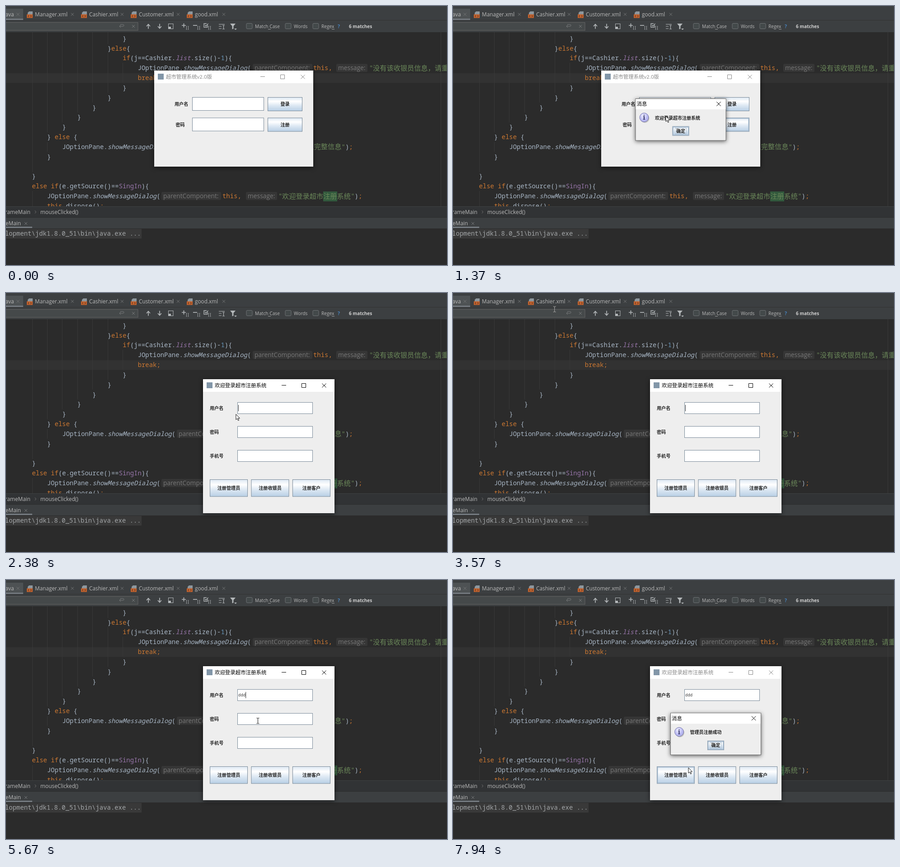
Write an HTML page that moves like this. It is 976 px wide and 574 px high and loops after 8 s.

```html
<!DOCTYPE html>
<html lang="zh-CN">
<head>
<meta charset="utf-8">
<style>
html, body { margin: 0; width: 100%; height: 100%; overflow: hidden; background: #2b2b2b; }
svg { display: block; width: 976px; height: 574px; }
text { white-space: pre; font-family: 'Open Sans', 'Noto Sans CJK SC', 'Noto Sans CJK', sans-serif; }
.code { font: 13.93px 'Noto Sans Mono', monospace; fill: #a9b7c6; }
.zh { font: 300 15.2px 'Noto Sans CJK SC', 'Noto Sans CJK', sans-serif; fill: #6a8759; }
.typed { font: 9px 'Liberation Mono', monospace; fill: #333; }
.kw { fill: #cc7832; }
.field { fill: #9876aa; }
.str { fill: #6a8759; }
.num { fill: #6897bb; }
.call { font-style: italic; }
.shadow { filter: drop-shadow(0 2px 5px #0009); }
</style>
</head>
<body>
<svg viewBox="0 0 976 574">
  <defs>
    <linearGradient id="ocean" x2="0" y2="1">
      <stop stop-color="#dde8f3"/><stop offset=".3" stop-color="#fff"/>
      <stop offset=".6" stop-color="#dde8f3"/><stop offset="1" stop-color="#b8cfe5"/>
    </linearGradient>
    <radialGradient id="info" cx=".4" cy=".3">
      <stop stop-color="#eeeeff"/><stop offset="1" stop-color="#b9b9f2"/>
    </radialGradient>
    <clipPath id="editor"><path d="M0 58H976V444H0Z"/></clipPath>
  </defs>
  <g id="ide"></g>
  <g id="login"></g>
  <g id="register"></g>
  <g id="dialog"></g>
  <g id="cursor"></g>
</svg>
<script>
const $ = id => document.getElementById(id);
const show = (id, on) => $(id).setAttribute('visibility', on ? 'inherit' : 'hidden');

const UI = '#bababa', DIM = '#77797a';
const rect = (x, y, w, h, fill, more = '') =>
  `<rect x="${x}" y="${y}" width="${w}" height="${h}" fill="${fill}" ${more}/>`;
const line = (d, color, width = 1) =>
  `<path d="${d}" fill="none" stroke="${color}" stroke-width="${width}"/>`;
const text = (x, y, size, fill, content, more = '') =>
  `<text x="${x}" y="${y}" font-size="${size}" fill="${fill}" ${more}>${content}</text>`;
const cross = (x, y, r, color) =>
  line(`M${x - r} ${y - r}l${2 * r} ${2 * r}m0 ${-2 * r}l${-2 * r} ${2 * r}`, color);

// ---- editor ----
const baseline = row => 76.7 + 21.83 * row;
const indent = depth => 57.5 + 33.45 * depth;
const span = (name, s) => `<tspan class="${name}">${s}</tspan>`;
const code = (row, x, s) => `<text class="code" x="${x}" y="${baseline(row)}">${s}</text>`;
const zh = (row, x, s) => `<text class="zh" x="${x}" y="${baseline(row) + .6}">${s}</text>`;
const hint = (row, x, w, s) =>
  rect(x, baseline(row) - 14, w, 18, '#363636', 'rx="3"') +
  text(x + 4, baseline(row) - .3, 13.8, '#787878', s);

function messageCall(row, depth, xs, message, closed) {
  const [parent, self, label, quote] = xs;
  const end = quote + 8.2 + message.length * 15.2;
  return code(row, indent(depth), 'JOptionPane.' + span('call', 'showMessageDialog') + '(') +
    hint(row, parent, 132, 'parentComponent:') + code(row, self, span('kw', 'this,')) +
    hint(row, label, 69, 'message:') + code(row, quote, span('str', '"')) +
    zh(row, quote + 8, message) +
    (closed ? code(row, end, span('str', '"') + ')' + span('kw', ';')) : '');
}

function editor() {
  const guides = [[0, 58, 368], [1, 58, 280], [2, 58, 258], [3, 58, 236], [4, 58, 214],
    [5, 58, 84], [5, 104, 192], [6, 126, 170], [1, 302, 323], [0, 410, 444]];
  const braces = [[0, 6], [5, 6], [6, 5], [7, 4], [8, 3], [9, 2], [12, 1], [14, 0]];
  return rect(0, 58, 976, 386, '#2b2b2b') + rect(0, 149, 976, 21.5, '#323232') +
    guides.map(([d, a, b]) => line(`M${Math.round(indent(d)) + .5} ${a}V${b}`, '#383838')).join('') +
    line('M962.5 58V444', '#3a3a3a') + rect(702, 411, 31, 22, '#32593d') +
    braces.map(([row, d]) => code(row, indent(d), '}')).join('') +
    code(1, indent(5), '}' + span('kw', 'else') + '{') +
    code(2, indent(6), span('kw', 'if') + '(j==Cashier.' + span('field call', 'list') +
      '.size()-' + span('num', '1') + '){') +
    messageCall(3, 7, [546, 680, 731, 804], '没有该收银员信息，请重', false) +
    code(4, indent(7), span('kw', 'break;')) +
    code(10, indent(1), '} ' + span('kw', 'else') + ' {') +
    messageCall(11, 2, [378, 512.5, 556, 628], '请输入完整信息', true) +
    code(15, indent(0), span('kw', 'else if') + '(e.getSource()==' + span('field', 'SingIn') + '){') +
    messageCall(16, 1, [344, 479, 531, 603], '欢迎登录超市注册系统', true) +
    code(17, indent(1), span('kw', 'this') + '.dispose()' + span('kw', ';'));
}

function tab(x, name, closeX) {
  return `<path d="M${x + 5} 12h8v8h-11v-5Z" fill="#8d979e"/>` + rect(x, 18.5, 13, 8, '#c4622d') +
    line(`M${x + 5} 20.5l-2.5 2 2.5 2m3-4l2.5 2-2.5 2`, '#3c2a20') +
    text(x + 18, 22.5, 11.8, UI, name) + cross(closeX, 18.5, 3, DIM);
}

function toolbar() {
  const icon = '#b4b8ba';
  const box = (x, label) => rect(x + .5, 38.5, 13, 12, '#43494a', 'stroke="#6f7375" rx="2"') +
    text(x + 19.5, 49.3, 10.2, UI, label);
  const bars = x => line(`M${x} 45v7m4-7v7m-5-7h2m2 0h2m-6 7h2m2 0h2`, '#9a9ea0');
  return rect(-2, 36.5, 294, 17.5, '#45494a', 'stroke="#646464"') +
    line('M253 41h6q2 0 2 2t-2 2h-8m3-3l-3 3 3 3', DIM) + cross(282, 45, 3, DIM) +
    line('M315 50.5V41m-4 4l4-4.5 4 4.5', icon, 1.7) + line('M340 39.5V49m-4-4l4 4.5 4-4.5', icon, 1.7) +
    rect(359.5, 39.5, 10.5, 11, 'none', `stroke="${icon}"`) + rect(360, 46, 5, 4, icon) +
    line('M389 43h9m-4.5-4.5v9', icon, 1.7) + bars(399.5) +
    line('M414 43h9', icon, 1.7) + bars(424.5) +
    line('M446 42v5h-8v-8h6m-4 3l2.5 2.5 5-5.5', icon, 1.3) + bars(448.5) +
    line('M471 40.5h13M471 45h6m-6 5h6m4.5-7v8m-2.5-8h5m-5 8h5', icon, 1.2) +
    `<path d="M496 39h12l-4.5 5.5v6l-3 1v-7Zm9 11h6l-3 3Z" fill="${icon}"/>` +
    box(531.5, 'Match Case') + box(617.5, 'Words') + box(678.5, 'Regex') +
    line('M580 51.5h6M721 51.5h6', UI, .8) +
    text(734, 49.3, 11, '#4a91d8', '?', 'font-weight="600"') +
    text(759, 49.3, 10, '#d0d0d0', '6 matches', 'font-weight="700"');
}

$('ide').innerHTML =
  rect(0, 0, 976, 58, '#3c3f41') + rect(0, 6, 38, 25, '#4e5254') + rect(0, 31, 976, 1, '#323232') +
  rect(0, 28, 38, 3, '#747a80') + text(17.5, 22.5, 11.8, UI, 'ava', 'text-anchor="end"') +
  cross(26.5, 18.5, 3, DIM) +
  tab(46, 'Manager.xml', 147) + tab(166, 'Cashier.xml', 257) +
  tab(276, 'Customer.xml', 381) + tab(400, 'good.xml', 482) + toolbar() +
  `<g clip-path="url(#editor)">${editor()}</g>` +
  rect(0, 444, 976, 25, '#313335') + rect(0, 444, 976, 1, '#3f4244') +
  text(54, 460.5, 11.8, UI, 'rameMain', 'text-anchor="end"') +
  line('M64 453.5l2.5 3-2.5 3', '#777') + text(76, 460.5, 11.9, UI, 'mouseClicked()') +
  rect(0, 468, 976, 25, '#3c3f41') + rect(0, 468, 976, 1, '#2a2a2a') +
  rect(0, 489, 58, 3, '#747a80') + text(33, 486, 11.8, UI, 'eMain', 'text-anchor="end"') +
  cross(44, 482, 3, DIM) + rect(0, 493, 976, 81, '#2b2b2b') + rect(0, 494, 300, 21.5, '#393939') +
  `<text class="code" x="-2" y="509.2" style="fill:#a3a6a8">lopment\\jdk1.8.0_51\\bin\\java.exe ...</text>`;

// ---- dialogs ----
const label = (x, y, s, more = '') => text(x, y + 3.7, 10.1, '#222', s, `font-weight="700" ${more}`);
const input = (x, y, w, h) => rect(x + .5, y + .5, w - 1, h - 1, '#fff', 'stroke="#7a8a99"');
const button = (x, y, w, h, s, id) =>
  rect(x + .5, y + .5, w - 1, h - 1, 'url(#ocean)', 'stroke="#7a8a99"') +
  `<g id="${id}Hot">${rect(x + 1.5, y + 1.5, w - 3, h - 3, 'none', 'stroke="#a3b8cc" stroke-width="2"')}</g>` +
  `<g id="${id}Down">${rect(x + 1, y + 1, w - 2, h - 2, '#b8cfe5')}</g>` +
  label(x + w / 2, y + h / 2, s, 'text-anchor="middle"');

function frame(x, y, w, h, title, id) {
  const right = x + w;
  return rect(x, y, w, h, '#eee', 'class="shadow"') + rect(x, y, w, 28, '#fff') +
    rect(x + 8, y + 7, 13, 13, '#8296a8') +
    `<g id="${id}Title" fill="#000" stroke="#000">` +
    text(x + 26, y + 18.3, 11.45, 'inherit', title, 'stroke="none"') +
    `<path d="M${right - 117} ${y + 13.5}h10m34.5-4h9v9h-9zm45 0l9 9m0-9l-9 9" fill="none"/></g>`;
}

function setActive(id, on) {
  for (const name of ['fill', 'stroke']) $(id + 'Title').setAttribute(name, on ? '#000' : '#888');
}

$('login').innerHTML = frame(328, 143, 352, 213, '超市管理系统v2.0版', 'login') +
  label(373, 217, '用户名') + label(375.5, 263, '密码') +
  input(412, 202, 159, 30) + input(412, 247.5, 159, 30) +
  button(579, 202, 77, 31, '登录', 'enter') + button(579, 247.5, 77, 31, '注册', 'signUp');

$('register').innerHTML = frame(436, 191, 291, 297, '欢迎登录超市注册系统', 'register') +
  ['用户名', '密码', '手机号'].map((s, i) =>
    label(451, 255 + 53.3 * i, s) + input(512, Math.round(242 + 53.2 * i), 167, 26)).join('') +
  ['注册管理员', '注册收银员', '注册客户'].map((s, i) =>
    button(451 + 91.5 * i, 413, 84, 38.5, s, 'role' + i)).join('') +
  '<text class="typed" id="user" x="514" y="258"/><text class="typed" id="pass" x="514" y="311.5"/>' +
  '<rect id="caret" width="1" height="14" fill="#333"/>';

$('dialog').innerHTML =
  rect(404, 205.5, 200, 92.5, '#eee', 'stroke="#666" class="shadow"') + rect(404.5, 206, 199, 23, '#fff') +
  text(406.5, 221.3, 11.4, '#000', '消息') + cross(588, 217, 4.7, '#000') +
  '<circle cx="424.5" cy="249" r="10" fill="#0003"/>' +
  '<circle cx="423" cy="247" r="9.8" fill="url(#info)" stroke="#6d6da8"/>' +
  text(423, 252, 14, '#333366', 'i', 'font-weight="700" text-anchor="middle" style="font-family:\'Noto Serif\',serif"') +
  '<text id="message" x="447" y="251.7" font-size="10" font-weight="700" fill="#222"/>' +
  button(485.5, 266.5, 37, 21, '确定', 'ok') +
  rect(491.5, 270.5, 25, 13, 'none', 'stroke="#a3b8cc"');

const beamShape = 'M-3 -6H-.5L0 -5.5 .5 -6H3M0 -5.5V5.5M-3 6H-.5L0 5.5 .5 6H3';
$('cursor').innerHTML =
  '<path id="arrow" d="M0 0V12L2.8 9.5 4.8 14 6.7 13.2 4.7 8.9H8.5Z" fill="#fff" stroke="#000" stroke-width=".9"/>' +
  `<g id="beam">${line(beamShape, '#0008', 2)}${line(beamShape, '#d8d8d8')}</g>`;

// ---- timeline ----
const LOOP = 8000;
const within = (t, a, b) => t >= a && t < b;
const path = [ // time, x, y
  [160, 770, 503], [260, 745, 270], [350, 690, 57], [450, 610, 150], [540, 574, 235], [670, 631, 262],
  [1150, 631, 262], [1370, 471, 244], [1500, 463, 250], [1830, 495.5, 277], [2150, 495.5, 277],
  [2400, 510, 268], [2770, 532, 257], [2900, 532, 257], [3000, 538, 250], [3110, 538, 250],
  [3400, 290, 80], [3570, 225, 36], [3650, 209, 38], [3880, 476, 177.5], [4900, 476, 177.5],
  [5280, 568, 314], [5400, 564, 316], [5670, 557.5, 312], [6500, 557, 312], [6700, 538, 368],
  [6940, 538, 368], [7010, 536, 383], [7550, 521, 416], [LOOP, 521, 416]];

function position(t) {
  const i = path.findIndex(p => p[0] > t);
  const [t0, x0, y0] = path[i - 1], [t1, x1, y1] = path[i];
  const k = (t - t0) / (t1 - t0);
  return [x0 + (x1 - x0) * k, y0 + (y1 - y0) * k];
}

function isBeam(t, x, y) {
  const inside = (left, top, right, bottom) => x >= left && x < right && y >= top && y < bottom;
  if (t < 2150) return !inside(328, 143, 680, 356);
  if (t < 2300 || !inside(436, 191, 727, 488)) return true;
  return [242, 295, 348].some(top => inside(512, top, 679, top + 26));
}

const typed = (t, times) => 'd'.repeat(times.filter(at => t >= at).length);

function caretOn(t) {
  if (t < 4640) return Math.floor((t - 270) / 500) % 2 === 0;
  return t < 7000 || within(t, 7500, 7710);
}

for (const id of ['enterHot', 'enterDown', 'role1Hot', 'role1Down', 'role2Hot', 'role2Down']) show(id, false);

function draw(t) {
  const first = t < 2150;
  show('login', first);
  show('register', t >= 2300);
  setActive('login', within(t, 810, 980));
  setActive('register', t < 7780);
  show('signUpHot', within(t, 600, 2150));
  show('signUpDown', within(t, 810, 980));
  show('role0Hot', t >= 7250);
  show('role0Down', within(t, 7710, 7780));

  show('dialog', within(t, 980, 2150) || t >= 7850);
  $('dialog').setAttribute('opacity', within(t, 980, 1070) || within(t, 7850, 7910) ? .6 : 1);
  $('dialog').setAttribute('transform', first ? '' : 'translate(77.5 89.5)');
  $('message').textContent = first ? '欢迎登录超市注册系统' : '管理员注册成功';
  show('okDown', within(t, 2000, 2150));

  const user = typed(t, [4640, 4850, 5180]), pass = typed(t, [6070, 6300, 6480]);
  $('user').textContent = user;
  $('pass').textContent = pass;
  const inPass = t >= 5750;
  $('caret').setAttribute('x', 514 + 5.4 * (inPass ? pass : user).length);
  $('caret').setAttribute('y', inPass ? 301 : 248);
  show('caret', t >= 2300 && caretOn(t));

  const visible = t >= 160 && !within(t, 4110, 4900);
  show('cursor', visible);
  if (!visible) return;
  const [x, y] = position(t), beam = isBeam(t, x, y);
  $('cursor').setAttribute('transform', `translate(${x} ${y})`);
  show('arrow', !beam);
  show('beam', beam);
  // The text pointer inverts whatever lies below it.
  const light = t >= 2300 && x >= 512 && y >= 242;
  $('beam').lastChild.setAttribute('stroke', light ? '#111' : '#d8d8d8');
  $('beam').firstChild.setAttribute('stroke', light ? 'none' : '#0008');
}

const start = performance.now();
function tick() {
  draw((performance.now() - start) % LOOP);
  requestAnimationFrame(tick);
}
tick();
</script>
</body>
</html>
```
